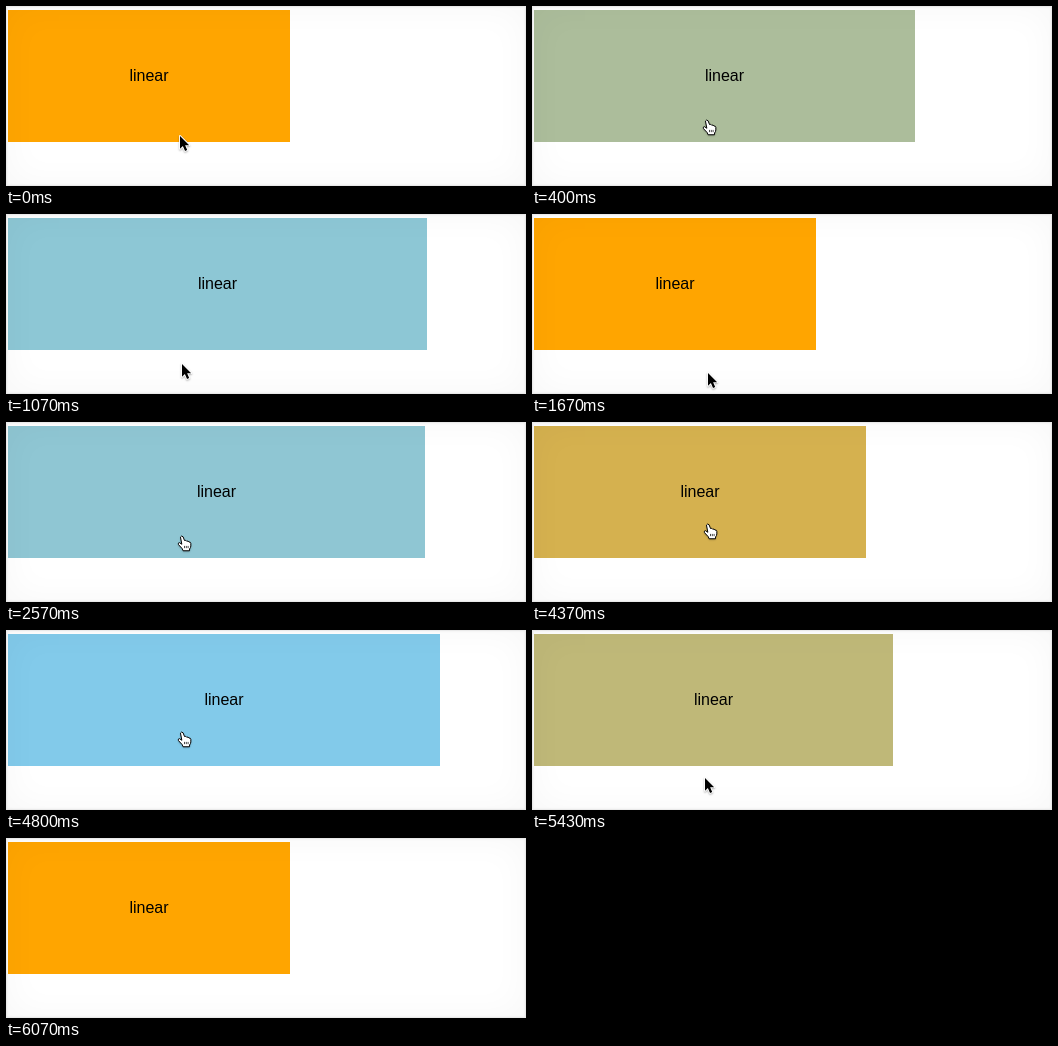
Write an HTML page with a canvas that moves like this. It is 520 by 180 pixels and loops after 6760 ms.

```html
<!DOCTYPE html>
<html lang="en">
<head>
<meta charset="utf-8">
<title>Linear transition</title>
<style>
  html, body { margin: 0; width: 100%; height: 100%; overflow: hidden; background: #fff; }
  canvas { display: block; position: absolute; left: 0; top: 0; }
  .frame {
    position: absolute; left: 0; top: 0; width: 520px; height: 180px; box-sizing: border-box;
    border: 1px solid #e9e9e9;
    box-shadow: inset 0 0 2px rgba(0, 0, 0, .08), inset 0 0 36px rgba(0, 0, 0, .035);
  }
</style>
</head>
<body>
<canvas width="520" height="180"></canvas>
<div class="frame"></div>
<script>
const ctx = document.querySelector('canvas').getContext('2d');
const LOOP = 6760;
const DURATION = 500;
const POINTER_GONE = 6070;
const POINTER_TRAVEL = 200;
const BOX = { x: 2, y: 4, height: 132, narrow: 282, wide: 432 };
const ORANGE = [255, 165, 0];
const SKY = [130, 202, 234];

// Each hover: when the pointer crosses the edge, and where it rests inside and outside.
const START = [174, 131];
const HOVERS = [
  { enter: 70, leave: 1027, inside: [175, 114], outside: [176, 159] },
  { enter: 2121, leave: 3160, inside: [176, 114], outside: [176, 153] },
  { enter: 4203, leave: 5187, inside: [176, 102], outside: [173, 148] }
];

const arrowShape = new Path2D('M0 0V14.2L3.2 11.2L5.6 16.6L8 15.5L5.7 10.2H10.2Z');
const handShape = new Path2D(
  'M-1.7 1.2Q-.6 -.9 1.2 .9L2.8 5Q4.4 4.2 5.2 5.8Q6.9 5 7.7 6.7Q9.4 6.2 9.8 8.2' +
  'V11Q9.7 13 8.4 14.4V16.4H1.2L.2 14L-3.9 9.6Q-4.8 7.4 -2.8 7.4L-.2 9.2Z');
const fingerLines = new Path2D('M2.8 11V13.5M4.8 11V13.5M6.8 11V13.5');

const clamp = v => Math.min(1, Math.max(0, v));
const mix = (a, b, k) => a + (b - a) * k;
const mixAll = (a, b, k) => a.map((v, i) => mix(v, b[i], k));
const smooth = k => k * k * (3 - 2 * k);

function progressAt(t) {
  return HOVERS.reduce((sum, { enter, leave }) =>
    sum + clamp((t - enter) / DURATION) - clamp((t - leave) / DURATION), 0);
}

function pointerAt(t) {
  const crossing = time => smooth(clamp((t - time) / POINTER_TRAVEL + 0.5));
  return HOVERS.reduce((position, { enter, leave, inside, outside }) =>
    mixAll(mixAll(position, inside, crossing(enter)), outside, crossing(leave)), START);
}

function drawBox(progress) {
  const width = Math.round(mix(BOX.narrow, BOX.wide, progress));
  ctx.fillStyle = `rgb(${mixAll(ORANGE, SKY, progress).map(Math.round)})`;
  ctx.fillRect(BOX.x, BOX.y, width, BOX.height);
  ctx.fillStyle = '#000';
  ctx.font = '16px "Liberation Sans", Arial, sans-serif';
  ctx.textAlign = 'center';
  ctx.fillText('linear', BOX.x + width / 2, 75);
}

function drawHand() {
  ctx.fillStyle = '#fff';
  ctx.fill(handShape);
  ctx.shadowColor = 'transparent';
  ctx.strokeStyle = '#000';
  ctx.lineWidth = 1.1;
  ctx.stroke(handShape);
  ctx.lineWidth = 0.8;
  ctx.stroke(fingerLines);
}

function drawArrow() {
  ctx.strokeStyle = '#fff';
  ctx.lineWidth = 2;
  ctx.stroke(arrowShape);
  ctx.shadowColor = 'transparent';
  ctx.fillStyle = '#000';
  ctx.fill(arrowShape);
}

function drawPointer(t) {
  const hovering = HOVERS.some(({ enter, leave }) => t >= enter && t < leave);
  const [x, y] = pointerAt(t).map(Math.round);
  ctx.save();
  ctx.translate(x, y);
  ctx.scale(0.9, 0.9);
  ctx.lineJoin = 'round';
  ctx.shadowColor = 'rgba(0, 0, 0, .3)';
  ctx.shadowBlur = 2;
  ctx.shadowOffsetY = 1;
  if (hovering) drawHand();
  else drawArrow();
  ctx.restore();
}

function render(t) {
  ctx.clearRect(0, 0, 520, 180);
  drawBox(progressAt(t));
  if (t < POINTER_GONE) drawPointer(t);
}

const start = performance.now();
function tick() {
  render((performance.now() - start) % LOOP);
  requestAnimationFrame(tick);
}
tick();
</script>
</body>
</html>
```
